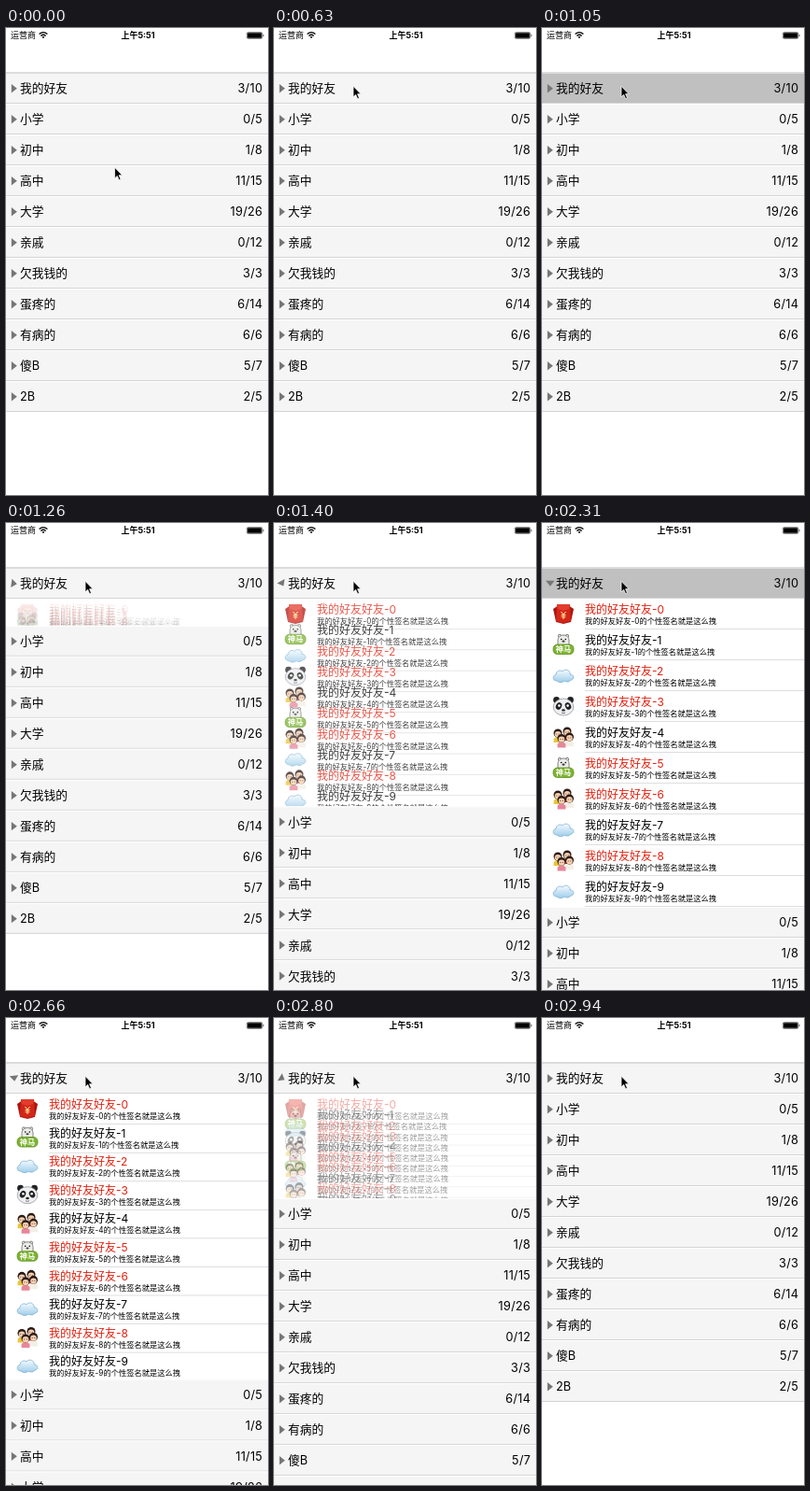
An HTML page for the animation above (3.22 s loop, 281 by 500 pixels).

```html
<!DOCTYPE html>
<html lang="zh-CN">
<head>
<meta charset="utf-8">
<title>好友列表</title>
<style>
  html, body { margin: 0; width: 100%; height: 100%; overflow: hidden; background: #fff; }
  svg { display: block; width: 100vw; height: 100vh; }
  text { font-family: Inter, "Noto Sans CJK SC", "Noto Sans CJK", sans-serif; fill: #000; }
  .title { font-size: 12.75px; }
  .count { font-size: 12.75px; letter-spacing: .25px; text-anchor: end; }
  .name { font-size: 12px; }
  .vip { fill: #e0200f; }
  .sign { font-size: 8.25px; }
  .status { font-size: 9px; }
</style>
</head>
<body>
<svg id="stage" viewBox="0 0 281 500">
  <defs>
    <linearGradient id="sky" x2="0" y2="1">
      <stop offset="0" stop-color="#f4fbff"/><stop offset="1" stop-color="#9fcdea"/>
    </linearGradient>
    <g id="packet">
      <path d="M-11-5L-5-9 5-9 11-5 8 9 0 11-8 9Z" fill="#a9160f"/>
      <path d="M-7-10H7L8 8 0 10-8 8Z" fill="#d3261a"/>
      <path d="M-7-10H7L6-5 0-3-6-5Z" fill="#e23d2c"/>
      <path d="M-2.6-2L0 1 2.6-2M0 1V6M-2.4 1.6H2.4M-2.4 3.7H2.4" fill="none" stroke="#ffd98a" stroke-width="1.1"/>
    </g>
    <g id="bear">
      <g fill="#ececea" stroke="#666" stroke-width=".8">
        <circle cx="-4" cy="-9" r="1.7"/><circle cx="4" cy="-9" r="1.7"/>
        <path d="M-6 4V-4C-6-12 6-12 6-4V4Z"/>
      </g>
      <circle cx="-2.3" cy="-5.5" r=".8"/><circle cx="2.3" cy="-5.5" r=".8"/>
      <ellipse cy="-3.3" rx="1.6" ry="1.1" fill="#444"/>
      <rect x="-11" y="0" width="22" height="10.5" rx="4.5" fill="#7db52f" stroke="#55861c" stroke-width=".7"/>
      <text y="8.2" font-size="8.2" font-weight="700" text-anchor="middle" style="fill:#fff">神马</text>
    </g>
    <g id="cloud">
      <path d="M-7 6C-12 6-12 0-8-.5C-8-5-3-6-1-4C2-8 8-5 7-1C12-1 12 5 8 5C6 8 2 7 1 6C-1 8-5 8-7 6Z" fill="url(#sky)" stroke="#7fb0d2" stroke-width=".8"/>
    </g>
    <g id="panda">
      <circle cx="-7.5" cy="-6.5" r="3.4" fill="#222"/><circle cx="7.5" cy="-6.5" r="3.4" fill="#222"/>
      <ellipse cy="1" rx="10.8" ry="9" fill="#eef0f1" stroke="#889" stroke-width=".7"/>
      <ellipse cx="-5" cy="0" rx="3" ry="4" transform="rotate(28 -5 0)" fill="#222"/>
      <ellipse cx="5" cy="0" rx="3" ry="4" transform="rotate(-28 5 0)" fill="#222"/>
      <circle cx="-4.6" cy="-.4" r="1.3" fill="#fff"/><circle cx="4.6" cy="-.4" r="1.3" fill="#fff"/>
      <ellipse cy="4.4" rx="1.8" ry="1.2" fill="#222"/>
      <path d="M-2 7Q0 8.4 2 7" fill="none" stroke="#444" stroke-width=".7"/>
    </g>
    <g id="pal">
      <path d="M-4.4 10V6Q0 1.5 4.4 6V10Z"/>
      <circle r="4.5" fill="#2b1a14"/>
      <ellipse cy="1.2" rx="3.3" ry="3.1" fill="#f7d0b0"/>
      <path d="M-1.7 1H-.8M.8 1H1.7" stroke="#222" stroke-width=".8"/>
    </g>
    <g id="crowd">
      <use href="#pal" x="-6" y="-4" fill="#e9c43c"/>
      <use href="#pal" x="4" y="-6" fill="#c83a36"/>
      <use href="#pal" x="6.5" y="0" fill="#f3efe4"/>
      <use href="#pal" x="-2" y="1.5" fill="#e8869a"/>
    </g>
  </defs>
  <rect width="281" height="500" fill="#fff"/>
  <g id="cells"></g>
  <g id="heads"></g>
  <rect y="47.5" width="281" height="1" fill="#b9b9b9"/>
  <text class="status" x="5" y="11.2">运营商</text>
  <path d="M35.6 6.6Q40 2.6 44.4 6.6M37.4 8.5Q40 6.1 42.6 8.5" fill="none" stroke="#000" stroke-width="1.3"/>
  <path d="M38.6 9.6Q40 8.4 41.4 9.6L40 11.2Z"/>
  <text class="status" x="141.5" y="11.2" font-weight="700" text-anchor="middle">上午5:51</text>
  <rect x="258.3" y="4.6" width="16.6" height="6.8" rx="1.5" fill="none" stroke="#000" stroke-width=".5"/>
  <rect x="259" y="5.3" width="15.2" height="5.4" rx=".8"/>
  <path d="M275.7 6.6Q277.4 8 275.7 9.4Z"/>
  <path id="cursor" d="M0 0V11.6L2.7 9.1 4.6 13.4 6.5 12.6 4.6 8.4H8.2Z" stroke="#fff" stroke-width=".8"/>
</svg>
<script>
const LOOP = 3220, TICK = 70, ROW = 33, TOP = 48;
const groups = [
  ['我的好友', '3/10'], ['小学', '0/5'], ['初中', '1/8'], ['高中', '11/15'],
  ['大学', '19/26'], ['亲戚', '0/12'], ['欠我钱的', '3/3'], ['蛋疼的', '6/14'],
  ['有病的', '6/6'], ['傻B', '5/7'], ['2B', '2/5']
];
const icons = ['packet', 'bear', 'cloud', 'panda', 'crowd', 'bear', 'crowd', 'cloud', 'crowd', 'cloud'];
const vips = [0, 2, 3, 5, 6, 8];
const $ = id => document.getElementById(id);

$('heads').innerHTML = groups.map(([title, count]) => `<g>
  <rect width="281" height="33" fill="#f5f5f5"/>
  <rect y="32" width="281" height="1" fill="#d4d4d4"/>
  <rect width="281" height="1" fill="#fff"/>
  <path class="arrow" d="M-3-4.7L3 0-3 4.7Z" fill="#757575"/>
  <text class="title" x="15" y="21.4">${title}</text>
  <text class="count" x="275.2" y="21.3">${count}</text></g>`).join('');

$('cells').innerHTML = icons.map((icon, i) => {
  const name = `${groups[0][0]}好友-${i}`;
  return `<g><use href="#${icon}" x="23" y="16"/>
    <text class="name${vips.includes(i) ? ' vip' : ''}" x="46" y="16.2">${name}</text>
    <text class="sign" x="46" y="27.2">${name}的个性签名就是这么拽</text>
    <rect x="46" y="32.3" width="235" height=".7" fill="#d0d0d0"/></g>`;
}).join('');

const heads = [...$('heads').children], cells = [...$('cells').children];
const arrows = heads.map(h => h.querySelector('.arrow'));
const face = heads[0].querySelector('rect');

const clamp = x => Math.min(1, Math.max(0, x));
const span = (t, from, to) => clamp((t - from) / (to - from));
const move = (el, x, y, more = '') => el.setAttribute('transform', `translate(${x} ${y}) ${more}`);

// cubic-bezier(.42, 0, .58, 1)
function ease(x) {
  if (x <= 0 || x >= 1) return x;
  let lo = 0, hi = 1;
  for (let i = 0; i < 24; i++) {
    const s = (lo + hi) / 2, r = 1 - s;
    if (1.26 * r * r * s + 1.74 * r * s * s + s * s * s < x) lo = s; else hi = s;
  }
  return lo * lo * (3 - 2 * lo);
}

function draw(t) {
  const p = ease(span(t, 1187, 1540)) - ease(span(t, 2594, 2940));
  const pressed = (t >= 1050 && t < 1190) || (t >= 2310 && t < 2590);

  heads.forEach((h, i) => move(h, 0, TOP + ROW * i + (i ? ROW * cells.length * p : 0)));
  arrows.forEach((a, i) => move(a, 8.8, 16.8, `rotate(${i ? 0 : 90 * p})`));
  cells.forEach((c, i) => {
    move(c, 0, TOP + ROW + ROW * p * i);
    c.setAttribute('opacity', clamp(p * 1.1));
  });
  face.setAttribute('fill', pressed ? '#c0c0c0' : '#f5f5f5');

  const m = span(t, 70, 630), q = (m + m * m * (3 - 2 * m)) / 2;
  move($('cursor'), 116.6 - 31.6 * q, 149.3 - 87 * q);
}

const start = performance.now();
function frame() {
  const t = (performance.now() - start) % LOOP;
  draw(Math.floor(t / TICK) * TICK);
  requestAnimationFrame(frame);
}
draw(0);
requestAnimationFrame(frame);
</script>
</body>
</html>
```
